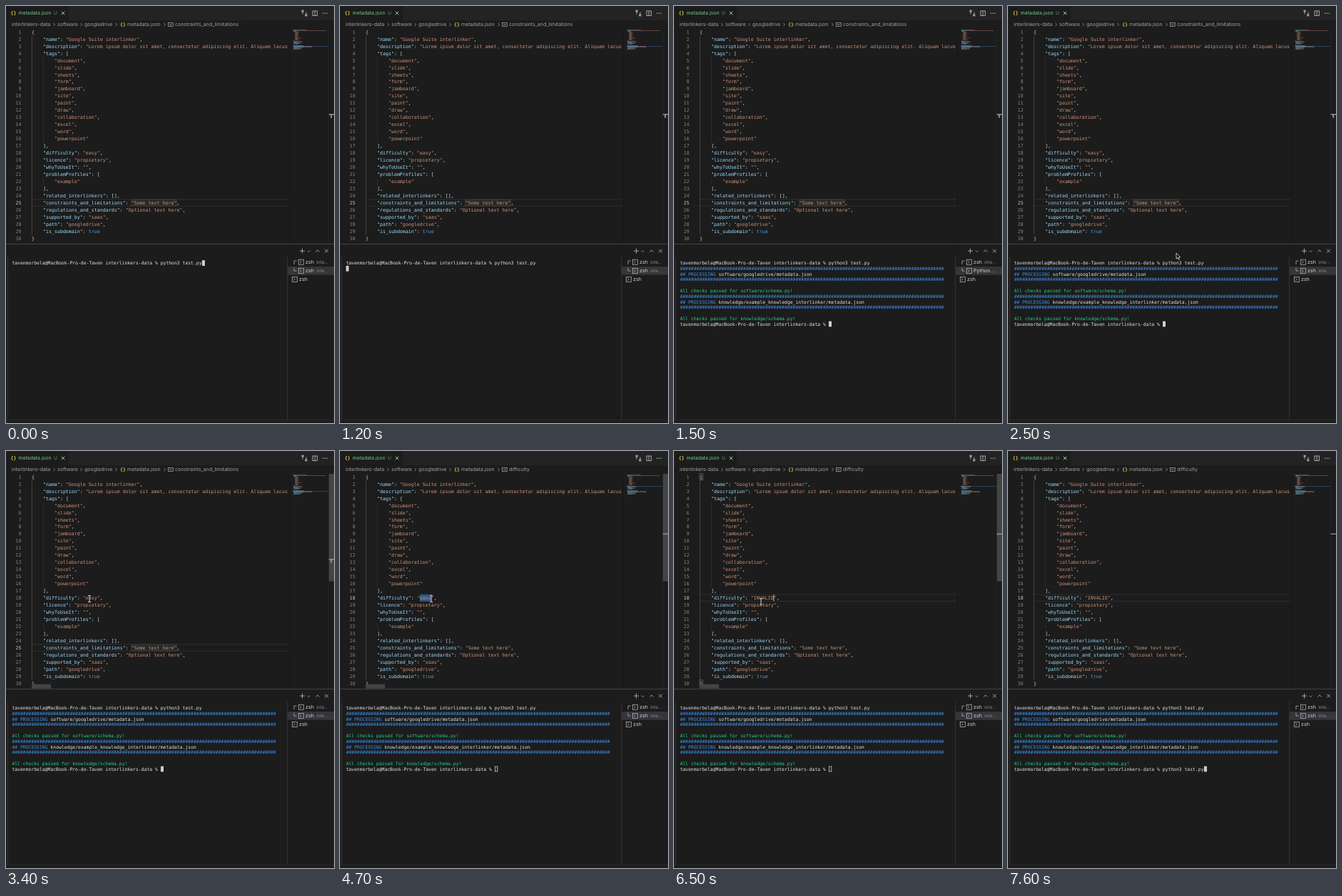
An HTML page with a canvas for the animation above (8 s loop, 460 by 584 pixels).

```html
<!DOCTYPE html>
<html lang="en">
<head>
<meta charset="utf-8">
<title>Editor and terminal</title>
<style>
  html, body { margin: 0; width: 100%; height: 100%; overflow: hidden; background: #1c1c1c; }
  canvas { display: block; width: 460px; height: 584px; }
</style>
</head>
<body>
<canvas id="stage" width="460" height="584"></canvas>
<script>
const ctx = document.getElementById('stage').getContext('2d');
const LOOP = 8000, STEP = 100;
const SANS = 'Inter, sans-serif';
const MONO = '"DejaVu Sans Mono", monospace';
const BG = '#1c1c1c';
const INK = '#d4d4d4', KEY = '#9cdcfe', STR = '#ce9178', BOOL = '#569cd6';
const BLUE = '#3b8eea', GREEN = '#23d18b', YELLOW = '#d7c93a';

const edit = { x: 36, y: 36.3, col: 3.99, row: 9.97, font: `6.63px ${MONO}` };
const term = { x: 8.4, y: 359.9, col: 3.863, row: 7.764, font: `6.417px ${MONO}` };

const tags = 'document slide sheets form jamboard site paint draw collaboration excel word powerpoint'.split(' ');
const source = difficulty => [
  '{',
  '    "name": "Google Suite interlinker",',
  '    "description": "Lorem ipsum dolor sit amet, consectetur adipiscing elit. Aliquam lacus',
  '    "tags": [',
  ...tags.map((tag, i) => `        "${tag}"${i < tags.length - 1 ? ',' : ''}`),
  '    ],',
  `    "difficulty": "${difficulty}",`,
  '    "licence": "propietary",',
  '    "whyToUseIt": "",',
  '    "problemProfiles": [',
  '        "example"',
  '    ],',
  '    "related_interlinkers": [],',
  '    "constraints_and_limitations": "Some text here",',
  '    "regulations_and_standards": "Optional text here",',
  '    "supported_by": "saas",',
  '    "path": "googledrive",',
  '    "is_subdomain": true',
  '}',
];

const prompt = 'tavenmorbela@MacBook-Pro-de-Taven interlinkers-data % ';
const command = 'python3 test.py';
const hashes = [[BLUE, '#'.repeat(96)]];
const report = (path, schema) => [
  hashes,
  [[BLUE, '## PROCESSING '], ['#e5e5e5', path + '/metadata.json']],
  hashes,
  [],
  [[GREEN, `All checks passed for ${schema}/schema.py!`]],
];
const output = [
  ...report('software/googledrive', 'software'),
  ...report('knowledge/example_knowledge_interlinker', 'knowledge'),
];

const rect = (x, y, w, h, color) => { ctx.fillStyle = color; ctx.fillRect(x, y, w, h); };
const box = (x, y, w, h, color, width = 0.7) => {
  ctx.strokeStyle = color; ctx.lineWidth = width; ctx.strokeRect(x, y, w, h);
};
const line = (color, width, ...pts) => {
  ctx.strokeStyle = color; ctx.lineWidth = width;
  ctx.beginPath();
  for (let i = 0; i < pts.length; i += 2) ctx.lineTo(pts[i], pts[i + 1]);
  ctx.stroke();
};
const text = (s, x, y, color, font = `7px ${SANS}`, align = 'left') => {
  ctx.font = font; ctx.fillStyle = color; ctx.textAlign = align;
  ctx.fillText(s, x, y);
};
const cross = (x, y, r, color) => {
  line(color, 0.8, x - r, y - r, x + r, y + r);
  line(color, 0.8, x - r, y + r, x + r, y - r);
};
const colX = (grid, c) => grid.x + c * grid.col;
const rowY = (grid, r) => grid.y + r * grid.row;

// Picks the last value whose start time has been reached.
const at = (t, ...steps) => steps.filter(s => s[0] <= t).pop()[1];

function tokens(src) {
  const found = [];
  for (const m of src.matchAll(/"[^"]*"?|true|[^\s"]+/g)) {
    const isKey = src[m.index + m[0].length] === ':';
    const color = m[0][0] === '"' ? (isKey ? KEY : STR) : m[0] === 'true' ? BOOL : INK;
    found.push([m.index, m[0], color]);
  }
  return found;
}

function pointer(t) {
  const glide = (t0, t1, a, b, ease) => {
    const p = ease(Math.min(1, (t - t0) / (t1 - t0)));
    return { x: a[0] + (b[0] - a[0]) * p, y: a[1] + (b[1] - a[1]) * p };
  };
  if (t >= 2500 && t < 3400) return glide(2500, 3200, [236, 346], [116.5, 207], p => p * p * (3 - 2 * p));
  if (t >= 3400 && t < 5000) {
    return { x: at(t, [0, 117], [4400, 125], [4600, 127], [4700, 128]), y: 207 };
  }
  if (t >= 6500 && t < 7500) return glide(6500, 6800, [122, 211], [184, 464], p => p * (2 - p));
  return null;
}

function stateAt(t) {
  const mouse = pointer(t);
  const value = at(t, [0, 'easy'], [5000, 'I'], [5100, 'IN'], [5200, 'INV'], [5300, 'INVAL'], [5500, 'INVALID']);
  const selected = at(t, [0, 0], [4100, 1], [4400, 3], [4700, 4], [5000, 0]);
  const focused = t >= 3600 && t < 7000;
  return {
    t, mouse, value, selected, focused,
    current: t < 3600 ? 24 : 17,
    caret: 19 + (t >= 5000 ? value.length : selected),
    dirty: t >= 5000 && t < 6000,
    brackets: focused && t >= 3900 && !selected,
    barX: t >= 2600 && t < 7000,
    barY: t >= 2600 && t < 7600,
  };
}

function drawTabs(s) {
  rect(0, 0, 460, 20, '#232324');
  rect(0, 0, 88, 20, BG);
  text('{}', 6.5, 12.3, YELLOW, `bold 6.5px ${MONO}`);
  text('metadata.json', 17.5, 12.4, '#73c991', `6.9px ${SANS}`);
  text('U', 67, 12.4, '#5c9f74', `6.6px ${SANS}`);
  if (s.dirty) {
    ctx.fillStyle = INK;
    ctx.beginPath(); ctx.arc(80, 10, 2.4, 0, 7); ctx.fill();
  } else cross(80, 10, 2.3, '#e0e0e0');

  const c = '#c5c5c5';
  line(c, 0.8, 418, 7, 416, 7, 416, 11.5);
  line(c, 0.8, 419, 13, 421, 13, 421, 8.5);
  box(415, 6, 2, 2, c); box(420, 12, 2, 2, c);
  box(430, 7, 6.5, 6.5, c, 0.8);
  line(c, 0.8, 433.2, 7, 433.2, 13.5);
  for (const x of [444, 446.8, 449.6]) rect(x, 9.6, 1.2, 1.2, c);
}

function drawCrumbs(s) {
  const c = '#a4a4a4';
  text('interlinkers-data', 8, 28.4, c);
  text('software', 72, 28.4, c);
  text('googledrive', 110, 28.4, c);
  text('{}', 160, 28.2, YELLOW, `bold 6.5px ${MONO}`);
  text('metadata.json', 170, 28.4, c);
  text(s.t < 3900 ? 'constraints_and_limitations' : 'difficulty', 237, 28.4, c);
  for (const x of [66.5, 104.5, 153.5, 221.5]) line(c, 0.7, x, 23.8, x + 2, 26, x, 28.2);
  box(227.4, 23.6, 6.8, 4.8, '#b5b5b5');
  line('#b5b5b5', 0.8, 229, 26, 232.6, 26);
}

function drawCode(s, lines) {
  const top = rowY(edit, s.current) - edit.row / 2;
  if (!s.selected) {
    for (const y of [top + 0.3, top + edit.row - 0.5]) line('#303030', 0.9, 36, y, 396, y);
  }
  const guide = (c, from, to, color) => {
    const x = colX(edit, c) + 0.4;
    line(color, 0.6, x, rowY(edit, from - 0.5), x, rowY(edit, to + 0.5));
  };
  guide(0, 1, 28, '#606060');
  guide(4, 4, 15, '#3c3c3c');
  guide(4, 21, 21, '#3c3c3c');

  if (s.t < 3600) {
    const x = colX(edit, 35), y = rowY(edit, 24) - 4.5;
    rect(x, y, 16 * edit.col, 9, 'rgba(90,90,90,.2)');
    box(x, y, 16 * edit.col, 9, 'rgba(150,130,120,.35)', 0.6);
  }
  if (s.selected) rect(colX(edit, 19), top, s.selected * edit.col, edit.row, '#2f5688');
  if (s.brackets) {
    for (const r of [0, 29]) box(edit.x, rowY(edit, r) - 4.6, 4.2, 9.2, '#888', 0.6);
  }

  ctx.save();
  ctx.beginPath(); ctx.rect(0, 30, 396, 302); ctx.clip();
  lines.forEach((src, r) => {
    const y = rowY(edit, r) + 2.4;
    text(r + 1, 21.4, y, r === s.current ? '#c6c6c6' : '#858585', edit.font, 'right');
    for (const [c, word, color] of tokens(src)) text(word, colX(edit, c), y, color, edit.font);
  });
  ctx.restore();
  if (s.focused) rect(colX(edit, s.caret) - 0.4, top + 0.3, 1, edit.row - 0.6, '#c8c8c8');
}

function drawMinimap(s, lines) {
  ctx.save();
  ctx.beginPath(); ctx.rect(401, 31, 51.5, 36); ctx.clip();
  rect(401, 32 + s.current, 52, 1.1, '#23405c');
  ctx.globalAlpha = 0.55;
  lines.forEach((src, r) => {
    for (const [c, word, color] of tokens(src)) {
      rect(401 + c * 0.53, 32.1 + r, word.length * 0.53, 0.7, color);
    }
  });
  ctx.restore();
  line('#171717', 1, 397.5, 32, 397.5, 332);
  line('#2c2c2c', 0.6, 452.7, 32, 452.7, 332);
  if (s.barY) rect(453, 32, 7, 150.5, '#444');
  if (s.barX) rect(36, 326.6, 27, 6, '#444');
  if (s.current === 24) {
    rect(452.7, 151.2, 7.3, 1.3, '#a8a8a8');
    rect(455, 152, 2.2, 4.6, '#888');
  } else {
    rect(452.7, 115.6, 7.3, 1.2, '#a0a0a0');
    if (s.t >= 4100 && s.t < 7300) rect(453.5, 114.8, 2.2, 2.8, '#777');
  }
}

function drawSidebar(s) {
  const c = '#c5c5c5';
  line(c, 0.8, 412, 343, 419, 343);
  line(c, 0.8, 415.5, 339.5, 415.5, 346.5);
  line(c, 0.7, 422.8, 342.6, 424.6, 344.4, 426.4, 342.6);
  line(c, 0.8, 434.4, 344.4, 437, 341.8, 439.6, 344.4);
  cross(449.5, 343, 2.4, c);

  rect(395, 365, 65, 11.7, '#35353a');
  const shell = (x, y, label, note) => {
    box(x, y - 3.5, 7, 7, c);
    line(c, 0.7, x + 2, y - 1.8, x + 3.9, y, x + 2, y + 1.8);
    text(label, x + 9.8, y + 2.4, '#d8d8d8');
    if (note) text('inte...', x + 25, y + 2.4, '#8c8c8c', `6.4px ${SANS}`);
  };
  const running = s.t >= 1300 && s.t < 1800;
  shell(410.3, 358.7, 'zsh', true);
  shell(410.3, 370.8, running ? 'Python...' : 'zsh', !running);
  shell(401.3, 382.8, 'zsh');
  line(c, 0.7, 407.5, 357, 404, 357, 404, 362);
  line(c, 0.7, 404, 366.5, 404, 371, 407.5, 371);
}

function drawTerminal(s) {
  line('#484848', 0.9, 0, 333.4, 460, 333.4);
  line('#3c3c3c', 0.8, 394.6, 351.5, 394.6, 580);
  line('#3c3c3c', 0.8, 2.4, 351.5, 2.4, 580);
  line('#303030', 0.8, 0, 580, 460, 580);

  const put = (r, runs) => {
    let c = 0;
    for (const [color, run] of runs) {
      text(run, colX(term, c), rowY(term, r) + 2.3, color, term.font);
      c += run.length;
    }
  };
  const full = prompt + command;
  put(0, [['#e5e5e5', full]]);
  const shown = at(s.t, [0, 0], [1400, 3], [1500, output.length]);
  output.slice(0, shown).forEach((runs, i) => put(i + 1, runs));
  if (s.t >= 1500) put(11, [['#e5e5e5', s.t < 7500 ? prompt : full]]);

  const [r, c] = at(s.t, [0, [0, full.length]], [1200, [1, 0]], [1400, [4, 0]],
    [1500, [11, prompt.length]], [7500, [11, full.length]]);
  const x = colX(term, c), y = rowY(term, r) - 3.8;
  if (s.focused) box(x + 0.4, y + 0.4, 3.4, 6.9, '#d0d0d0', 0.8);
  else rect(x, y, 4, 7.7, '#d0d0d0');
}

function drawPointer({ x, y }) {
  if (y > 333 && y < 352) {
    ctx.beginPath();
    for (const [dx, dy] of [[0, 0], [0, 8], [1.9, 6.4], [3.1, 9.2], [4.4, 8.6], [3.2, 5.9], [5.6, 5.7]]) {
      ctx.lineTo(x + dx, y + dy);
    }
    ctx.closePath();
    ctx.fillStyle = '#000'; ctx.fill();
    ctx.strokeStyle = '#eee'; ctx.lineWidth = 0.8; ctx.stroke();
    return;
  }
  for (const [color, width] of [['#222', 1.8], ['#eee', 0.9]]) {
    line(color, width, x, y - 4, x, y + 4);
    for (const d of [-1, 1]) line(color, width, x - 2, y + d * 4.6, x, y + d * 4, x + 2, y + d * 4.6);
  }
}

function render(t) {
  const s = stateAt(t), lines = source(s.value);
  rect(0, 0, 460, 584, BG);
  drawTabs(s);
  drawCrumbs(s);
  drawCode(s, lines);
  drawMinimap(s, lines);
  drawTerminal(s);
  drawSidebar(s);
  if (s.mouse) drawPointer(s.mouse);
}

ctx.textRendering = 'geometricPrecision';
const start = performance.now();
function tick() {
  const t = (performance.now() - start) % LOOP;
  render(Math.floor(t / STEP) * STEP);
  requestAnimationFrame(tick);
}
tick();
</script>
</body>
</html>
```
